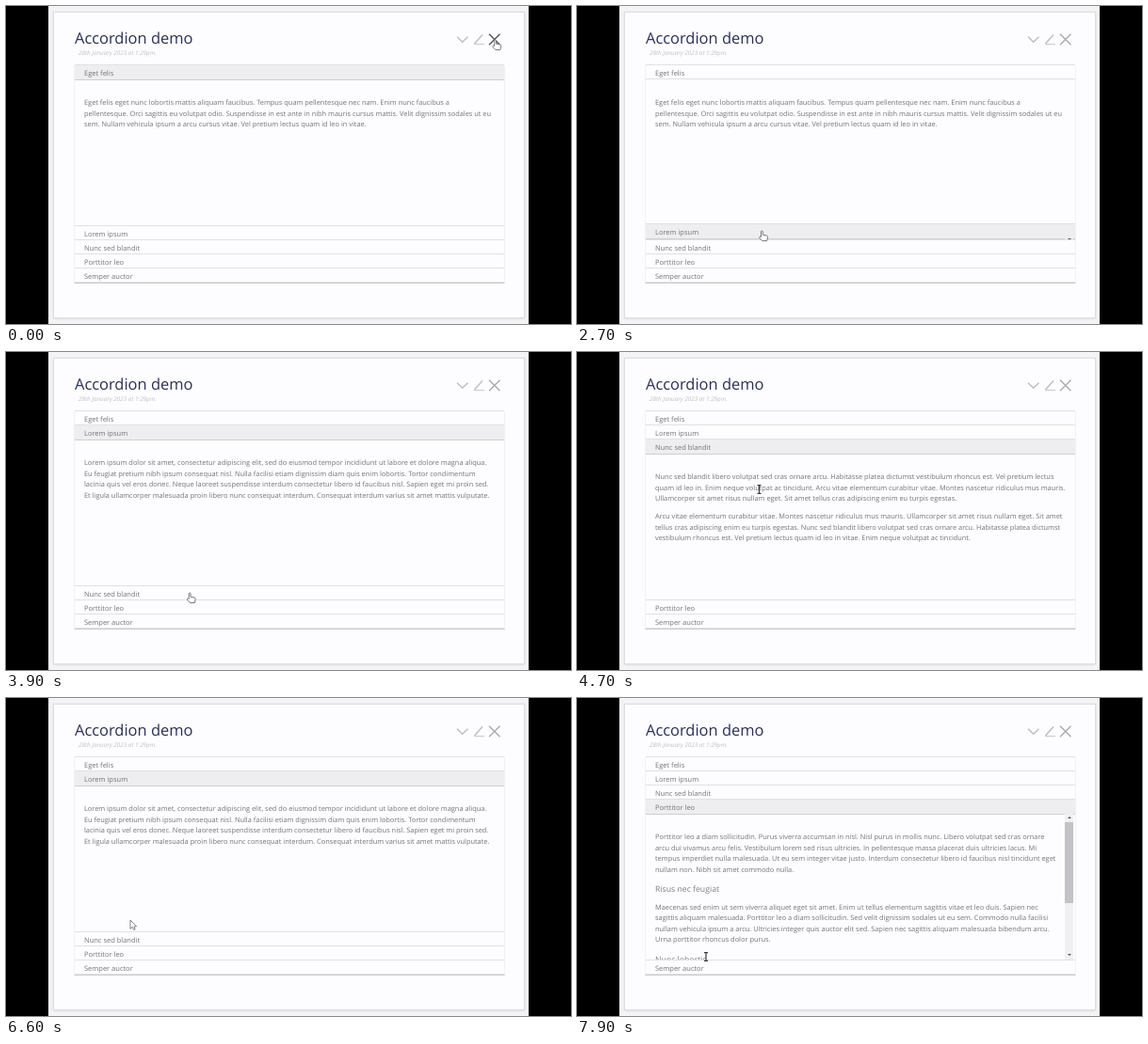
Recreate the animation shown at these times as an HTML page. Size 600 by 338 pixels, loop 8000 ms.

```html
<!DOCTYPE html>
<html lang="en">
<head>
<meta charset="utf-8">
<title>Accordion demo</title>
<style>
html, body { margin: 0; width: 100%; height: 100%; overflow: hidden; background: #000; }
#stage {
  position: absolute; left: 0; top: 0; width: 600px; height: 338px; overflow: hidden; background: #000;
  font: 7.4px/12px "Open Sans", "Noto Sans", sans-serif; color: #757479;
  text-rendering: geometricPrecision; cursor: none;
}
#stage div, #stage svg { position: absolute; }
#page { left: 45px; top: 0; width: 510px; height: 338px; background: #f4f3f6; }
#card {
  left: 51px; top: 7px; width: 499px; height: 324px; background: #fdfcfe;
  box-shadow: 0 0 1px 1px #dddce0, 0 1px 3px rgba(0, 0, 0, .14);
}
.text { white-space: pre; height: 12px; }
#title { left: 73px; top: 22px; font-size: 16.45px; line-height: 24px; color: #2a3153; white-space: pre; }
#date { left: 77px; top: 44px; font-size: 6.3px; font-style: italic; color: #c0bfc5; }
#box {
  left: 72px; top: 63px; width: 456px; height: 231px;
  border: solid #f2f1f4; border-width: 0 1px; border-bottom: 1px solid #cccbd0;
}
.head {
  left: 0; width: 456px; height: 14px; margin-top: -1px;
  border: solid #e1e0e4; border-width: 1px 0;
}
.head.open { height: 15px; background: #eeedf0; border-bottom-color: #cfced2; }
.head .text { left: 10px; top: 3px; font-size: 7.5px; }
.panel { left: 0; width: 456px; overflow: hidden; }
.panel .text { left: 10px; }
.panel .sub { font-size: 8.7px; color: #807f84; }
.bar { right: 2px; top: 0; width: 9px; height: 100%; background: #f0eff2; }
.thumb { left: 0; width: 9px; background: #c3c2c6; }
.tick { left: 2.5px; width: 0; height: 0; border: 2px solid transparent; }
.up { border-bottom: 2.5px solid #555; border-top: 0; }
.down { border-top: 2.5px solid #555; border-bottom: 0; }
</style>
</head>
<body>
<div id="stage">
  <div id="page"></div>
  <div id="card"></div>
  <div id="title">Accordion demo</div>
  <div id="date" class="text">28th January 2023 at 1:29pm.</div>
  <div id="box"></div>
  <svg id="art" width="600" height="338" fill="none">
    <g stroke="#bebdc2" stroke-width="1.4">
      <path d="M479 32.7L484.7 38.2L490.5 32.7"/>
      <path d="M497.5 40L506 30.5"/>
      <path d="M497 40.7H508" stroke-width=".9"/>
      <path id="close" d="M513 29.7L524.5 41.3M524.5 29.7L513 41.3"/>
    </g>
    <g id="pointer" stroke-linejoin="round">
      <path id="arrow" fill="#fff" stroke="#77767c" stroke-width=".9"
        d="M0 0V9.4L2.2 7.4L3.8 10.5L5.2 9.9L3.8 6.9H6.6Z"/>
      <path id="hand" fill="#fff" stroke="#77767c" stroke-width="1"
        d="M-.8 .8C-.8 -.4 1 -.4 1 .8V4.2L5 5Q6.4 5.3 6.2 6.6L5.4 10.6H.4L-2.4 7.6Q-3 6.2 -1.9 5.8L-.8 6.6Z"/>
      <path id="beam" stroke="#3c3b42" stroke-width="1.2" d="M-2 -4.3H2M0 -4.3V4.3M-2 4.3H2"/>
    </g>
  </svg>
</div>
<script>
const LOOP = 8000, OPEN_MS = 500, HEAD = 15, ROOM = 156, TOP = 63;

// Lines starting with # are subheadings; an empty line ends a paragraph.
const sections = [
  { name: "Eget felis", full: 72, body:
`Eget felis eget nunc lobortis mattis aliquam faucibus. Tempus quam pellentesque nec nam. Enim nunc faucibus a
pellentesque. Orci sagittis eu volutpat odio. Suspendisse in est ante in nibh mauris cursus mattis. Velit dignissim sodales ut eu
sem. Nullam vehicula ipsum a arcu cursus vitae. Vel pretium lectus quam id leo in vitae.` },
  { name: "Lorem ipsum", full: 83, body:
`Lorem ipsum dolor sit amet, consectetur adipiscing elit, sed do eiusmod tempor incididunt ut labore et dolore magna aliqua.
Eu feugiat pretium nibh ipsum consequat nisl. Nulla facilisi etiam dignissim diam quis enim lobortis. Tortor condimentum
lacinia quis vel eros donec. Neque laoreet suspendisse interdum consectetur libero id faucibus nisl. Sapien eget mi proin sed.
Et ligula ullamcorper malesuada proin libero nunc consequat interdum. Consequat interdum varius sit amet mattis vulputate.` },
  { name: "Nunc sed blandit", full: 114, body:
`Nunc sed blandit libero volutpat sed cras ornare arcu. Habitasse platea dictumst vestibulum rhoncus est. Vel pretium lectus
quam id leo in. Enim neque volutpat ac tincidunt. Arcu vitae elementum curabitur vitae. Montes nascetur ridiculus mus mauris.
Ullamcorper sit amet risus nullam eget. Sit amet tellus cras adipiscing enim eu turpis egestas.

Arcu vitae elementum curabitur vitae. Montes nascetur ridiculus mus mauris. Ullamcorper sit amet risus nullam eget. Sit amet
tellus cras adipiscing enim eu turpis egestas. Nunc sed blandit libero volutpat sed cras ornare arcu. Habitasse platea dictumst
vestibulum rhoncus est. Vel pretium lectus quam id leo in vitae. Enim neque volutpat ac tincidunt.` },
  { name: "Porttitor leo", full: 247, body:
`Porttitor leo a diam sollicitudin. Purus viverra accumsan in nisl. Nisl purus in mollis nunc. Libero volutpat sed cras ornare
arcu dui vivamus arcu felis. Vestibulum lorem sed risus ultricies. In pellentesque massa placerat duis ultricies lacus. Mi
tempus imperdiet nulla malesuada. Ut eu sem integer vitae justo. Interdum consectetur libero id faucibus nisl tincidunt eget
nullam non. Nibh sit amet commodo nulla.

#Risus nec feugiat
Maecenas sed enim ut sem viverra aliquet eget sit amet. Enim ut tellus elementum sagittis vitae et leo duis. Sapien nec
sagittis aliquam malesuada. Porttitor leo a diam sollicitudin. Sed velit dignissim sodales ut eu sem. Commodo nulla facilisi
nullam vehicula ipsum a arcu. Ultricies integer quis auctor elit sed. Sapien nec sagittis aliquam malesuada bibendum arcu.
Urna porttitor rhoncus dolor purus.

#Nunc lobortis` },
  { name: "Semper auctor", full: 0, body: "" }
];

// time of click, section opened
const clicks = [[-9999, 0], [2622, 1], [4000, 2], [5600, 1], [7050, 3]];

// time, x, y of the pointer tip
const path = [
  [0, 519.5, 36], [400, 519.5, 36], [1500, 223, 214], [1750, 223, 214],
  [2350, 196.3, 239], [3200, 196.3, 239], [3750, 195, 256], [4200, 195, 256],
  [4650, 193.5, 146], [5000, 193.5, 146], [5450, 165, 86], [5850, 165, 86],
  [6450, 132, 236], [6650, 132, 236], [6900, 135, 270], [7250, 135, 270],
  [7500, 137, 275], [LOOP, 137, 275]
];

const $ = id => document.getElementById(id);
const clamp = v => Math.max(0, Math.min(1, v));
const smooth = v => v * v * (3 - 2 * v);
const cubic = v => v < .5 ? 4 * v ** 3 : 1 - 4 * (1 - v) ** 3;

function add(parent, cls, text = "") {
  const el = document.createElement("div");
  el.className = cls;
  el.textContent = text;
  parent.appendChild(el);
  return el;
}

function build(section) {
  section.head = add($("box"), "head");
  add(section.head, "text", section.name);
  section.panel = add($("box"), "panel");
  section.lines = [];
  let y = 25;
  for (const line of section.body.split("\n")) {
    if (!line) { y += 7.7; continue; }
    const sub = line[0] === "#";
    if (sub) y += 1.5;
    const el = add(section.panel, sub ? "text sub" : "text", sub ? line.slice(1) : line);
    el.style.top = y - 6 + "px";
    section.lines.push(y);
    y += sub ? 19.5 : 11.5;
  }
  section.bar = add(section.panel, "bar");
  section.thumb = add(section.bar, "thumb");
  section.up = add(section.bar, "tick up");
  section.down = add(section.bar, "tick down");
}

function setBar(s, h) {
  const shown = h > 0 && h < s.full;
  s.bar.style.display = shown ? "" : "none";
  if (!shown) return;
  const mid = Math.min(4.5, h / 4), track = h - 18;
  s.up.style.top = mid - 1.2 + "px";
  s.down.style.top = h - mid - 1.2 + "px";
  s.thumb.style.top = "9px";
  s.thumb.style.height = (track > 8 ? track * h / s.full : 0) + "px";
}

function layout(t) {
  let n = clicks.length - 1;
  while (clicks[n][0] > t) n--;
  const [start, now] = clicks[n];
  const before = n ? clicks[n - 1][1] : now;
  const k = cubic(clamp((t - start) / OPEN_MS));
  let y = 0;
  sections.forEach((s, i) => {
    const h = ROOM * (i === now ? (n ? k : 1) : i === before ? 1 - k : 0);
    s.y = y;
    s.h = h;
    s.head.style.top = y + "px";
    s.head.classList.toggle("open", i === now);
    s.panel.style.top = y + HEAD + "px";
    s.panel.style.height = Math.max(0, h - 1) + "px";
    setBar(s, h - 1);
    y += HEAD + h;
  });
}

function pointerAt(t) {
  let i = 0;
  while (i < path.length - 2 && path[i + 1][0] <= t) i++;
  const [t0, x0, y0] = path[i], [t1, x1, y1] = path[i + 1];
  const k = smooth(clamp((t - t0) / (t1 - t0)));
  return [x0 + (x1 - x0) * k, y0 + (y1 - y0) * k];
}

const onClose = (x, y) => x > 511 && y < 43;

function shapeAt(x, y) {
  if (onClose(x, y)) return "hand";
  if (x < 73 || x > 528) return "arrow";
  for (const s of sections) {
    const dy = y - TOP - s.y;
    if (dy >= 0 && dy < HEAD) return "hand";
    const inside = dy - HEAD;
    if (inside >= 0 && inside < s.h && x < 517)
      return s.lines.some(l => Math.abs(l - inside) < 6) ? "beam" : "arrow";
  }
  return "arrow";
}

function draw(t) {
  layout(t);
  const [x, y] = pointerAt(t), shape = shapeAt(x, y);
  $("pointer").setAttribute("transform", `translate(${x} ${y})`);
  for (const id of ["arrow", "hand", "beam"])
    $(id).style.display = id === shape ? "" : "none";
  $("close").setAttribute("stroke", onClose(x, y) ? "#58575d" : "#abaab0");
}

function tick() {
  draw(performance.now() % LOOP);
  requestAnimationFrame(tick);
}

sections.forEach(build);
tick();
</script>
</body>
</html>
```
